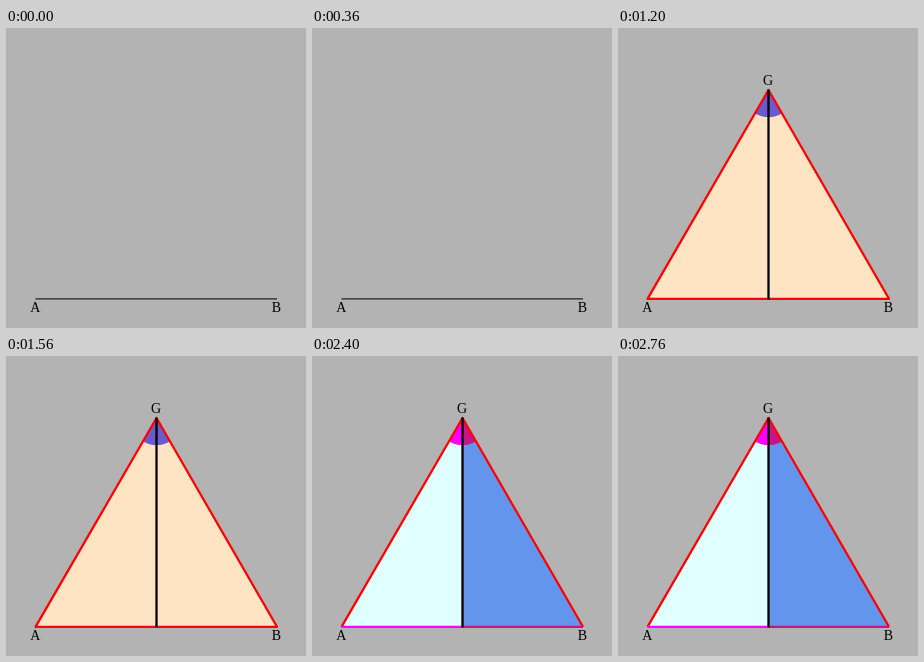
An HTML page for the animation above (3000 ms loop, 300 by 300 pixels).

```html
<!DOCTYPE html>
<html lang="en">
<head>
<meta charset="utf-8">
<title>Bisecting a segment</title>
<style>
  html, body { margin: 0; width: 100%; height: 100%; overflow: hidden; background: #b3b3b3; }
  svg { display: block; width: 300px; height: 300px; }
  text { font: 14px "Liberation Serif", "Times New Roman", serif; text-anchor: middle; }
  .line { fill: none; stroke-width: 2.3; stroke-linejoin: round; }
</style>
</head>
<body>
<svg viewBox="0 0 300 300">
  <rect width="300" height="300" fill="#b3b3b3"/>
  <path data-from="0" data-to="0" d="M29.5 270.8H271" stroke="#222" stroke-width="1.2"/>

  <path data-from="1" data-to="2" d="M150.5 62L29.5 270.8H271Z" fill="#ffe4c4"/>
  <path data-from="3" d="M150.5 62L29.5 270.8H150.5Z" fill="#e0ffff"/>
  <path data-from="3" d="M150.5 62L271 270.8H150.5Z" fill="#6495ed"/>

  <path data-from="2" data-to="2" d="M150.5 62L137 85.4A27 27 0 0 0 164 85.4Z" fill="#6a5acd"/>
  <path data-from="3" d="M150.5 62L137 85.4A27 27 0 0 0 150.5 89Z" fill="#f0f"/>
  <path data-from="3" d="M150.5 62L164 85.4A27 27 0 0 1 150.5 89Z" fill="#c71585"/>

  <path data-from="1" data-to="2" class="line" d="M150.5 62L29.5 270.8H271Z" stroke="#f00"/>
  <path data-from="3" class="line" d="M29.5 270.8L150.5 62L271 270.8" stroke="#f00"/>
  <path data-from="3" data-to="3" class="line" d="M29.5 270.8H271" stroke="#00f"/>
  <path data-from="4" class="line" d="M29.5 270.8H150.5" stroke="#f0f"/>
  <path data-from="4" class="line" d="M150.5 270.8H271" stroke="#c71585"/>
  <path data-from="2" class="line" d="M150.5 61.5V271.5" stroke="#000"/>

  <text x="29.3" y="284">A</text>
  <text x="270.3" y="284">B</text>
  <text data-from="1" x="150" y="57">G</text>
</svg>
<script>
  const STEP = 600, STEPS = 5;
  const parts = [...document.querySelectorAll("[data-from]")];
  const start = performance.now();

  function draw(time) {
    const step = Math.floor(time / STEP) % STEPS;
    for (const part of parts) {
      const { from, to = STEPS - 1 } = part.dataset;
      part.style.display = step >= +from && step <= +to ? "" : "none";
    }
  }

  function tick() {
    draw(performance.now() - start);
    requestAnimationFrame(tick);
  }
  tick();
</script>
</body>
</html>
```
